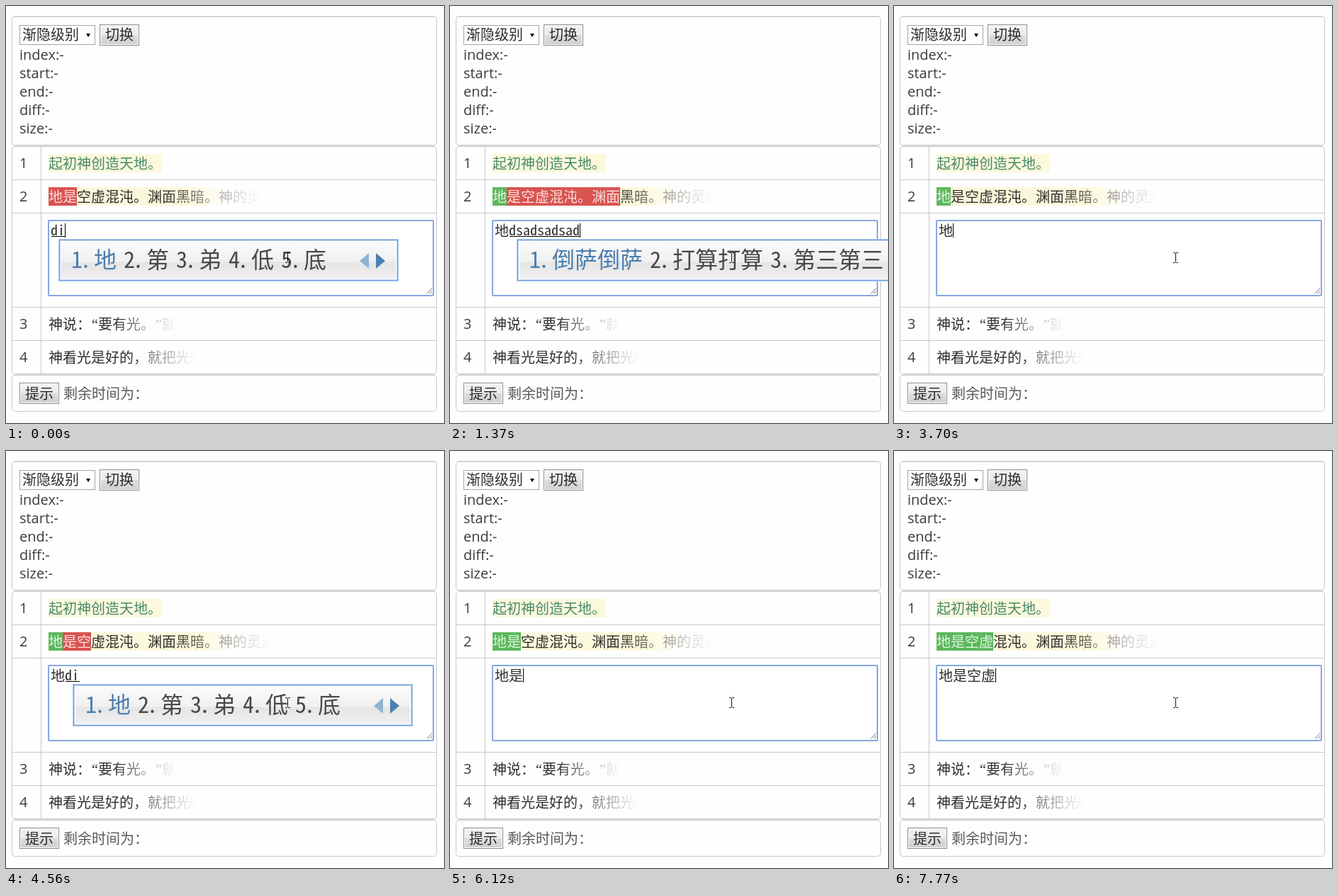
An HTML page for the animation above (8000 ms loop, 618 px wide and 589 px high).

```html
<!DOCTYPE html>
<html lang="zh-CN">
<head>
<meta charset="utf-8">
<title>Typing practice</title>
<style>
  html, body { margin: 0; width: 100%; height: 100%; overflow: hidden; background: #fefefe; }
  svg { display: block; width: 618px; height: 589px; }
  text { white-space: pre; }
  .cjk { font: 300 20px "Noto Sans CJK SC", "Noto Sans CJK", sans-serif; fill-opacity: .82; }
  .label { font: 500 20px "Open Sans", sans-serif; fill: #3c3c3c; }
  .half { font: 20px "Noto Sans Mono CJK SC", "Liberation Mono", monospace; fill-opacity: .82; }
  .quote { font: 20px "Liberation Serif", serif; }
  .cand { font: 32px "Noto Sans CJK SC", "Noto Sans CJK", sans-serif; }
  .num { font: 32px "Noto Sans Mono CJK SC", "Noto Sans CJK SC", sans-serif; }
  #popup { fill: #484848; }
  #popup .first { fill: #4a7eae; }
  .line { fill: none; stroke: #c8c8c8; }
  .button { fill: url(#face); stroke: #8a8a8a; }
  .bevel { fill: none; stroke: #fff; }
</style>
</head>
<body>
<svg viewBox="0 0 618 589">
  <defs>
    <linearGradient id="face" x2="0" y2="1">
      <stop stop-color="#f2f2f2"/><stop offset=".5" stop-color="#ebebeb"/>
      <stop offset=".5" stop-color="#ddd"/><stop offset="1" stop-color="#cfcfcf"/>
    </linearGradient>
    <linearGradient id="glass" x2="0" y2="1">
      <stop stop-color="#fbfbfb"/><stop offset=".54" stop-color="#f0f0f0"/>
      <stop offset=".56" stop-color="#e5e5e5"/><stop offset="1" stop-color="#efefef"/>
    </linearGradient>
    <linearGradient id="ink2" gradientUnits="userSpaceOnUse" y1="0" y2="0">
      <stop/><stop offset=".5" stop-opacity=".45"/><stop offset="1" stop-opacity="0"/>
    </linearGradient>
    <linearGradient id="mark2" gradientUnits="userSpaceOnUse" y1="0" y2="0">
      <stop offset=".3" stop-color="#fcf8dc"/><stop offset=".7" stop-color="#fcf8dc" stop-opacity="0"/>
    </linearGradient>
    <linearGradient id="ink3" gradientUnits="userSpaceOnUse" x1="150" x2="241" y1="0" y2="0">
      <stop/><stop offset=".5" stop-opacity=".45"/><stop offset="1" stop-opacity="0"/>
    </linearGradient>
    <linearGradient id="ink4" gradientUnits="userSpaceOnUse" x1="173" x2="267" y1="0" y2="0">
      <stop/><stop offset=".5" stop-opacity=".45"/><stop offset="1" stop-opacity="0"/>
    </linearGradient>
  </defs>

  <g class="line">
    <rect x="8.5" y="14.5" width="599" height="182" rx="4"/>
    <rect x="8.5" y="198.5" width="599" height="321" rx="4"/>
    <rect x="8.5" y="521.5" width="599" height="51" rx="4"/>
    <path d="M49.5 198V520M8 245.5H608M8 292.5H608M8 425.5H608M8 472.5H608"/>
    <path d="M11 15.5H605M11 197.5H605M11 520.5H605" stroke="#ddd"/>
  </g>

  <rect x="19.5" y="27.5" width="106" height="27" fill="#fff" stroke="#a5a5a5"/>
  <text class="cjk" x="23" y="48">渐隐级别</text>
  <path d="M113 39h6l-3 5z"/>
  <rect class="button" x="132.5" y="26.5" width="55" height="29"/>
  <rect class="bevel" x="133.5" y="27.5" width="53" height="27"/>
  <text class="cjk" x="140" y="48">切换</text>
  <g class="label">
    <text x="19" y="76">index:-</text>
    <text x="19" y="102">start:-</text>
    <text x="19" y="128">end:-</text>
    <text x="19" y="154">diff:-</text>
    <text x="19" y="180">size:-</text>
    <text x="19" y="229">1</text>
    <text x="19" y="276">2</text>
    <text x="19" y="456">3</text>
    <text x="19" y="503">4</text>
  </g>

  <rect x="60" y="209" width="160" height="26" fill="#fcf8dc"/>
  <text class="cjk" x="60" y="230" fill="#1f7050">起初神创造天地。</text>

  <rect x="60" y="256" width="312" height="26" fill="url(#mark2)"/>
  <text class="cjk" x="60" y="277" fill="url(#ink2)">地是空虚混沌。渊面黑暗。神的灵运</text>
  <rect id="right" x="60" y="256" height="26" fill="#5cb85c"/>
  <rect id="wrong" y="256" height="26" fill="#d9534f"/>
  <text id="done" class="cjk" x="60" y="277" fill="#fff"></text>

  <g class="cjk" fill="url(#ink3)">
    <text x="60" y="457">神说：</text>
    <text class="quote" x="121" y="457">“</text>
    <text x="130" y="457">要有光。</text>
    <text class="quote" x="211" y="457">”</text>
    <text x="220" y="457">就</text>
  </g>
  <text class="cjk" x="60" y="504" fill="url(#ink4)">神看光是好的，就把光暗</text>

  <rect class="button" x="19.5" y="532.5" width="55" height="29"/>
  <rect class="bevel" x="20.5" y="533.5" width="53" height="27"/>
  <text class="cjk" x="27" y="555">提示</text>
  <text class="cjk" x="81" y="555" fill="#333">剩余时间为：</text>

  <rect x="60" y="303" width="543" height="106" rx="1" fill="#fff" stroke="#86a8e0" stroke-width="2"/>
  <path d="M594 406l7-7M598 406l3-3" stroke="#777"/>
  <text id="committed" class="cjk" x="63" y="325"></text>
  <text id="typed" class="half" y="324"></text>
  <rect id="underline" y="325" height="1"/>
  <rect id="caret" y="307" width="1" height="20"/>
  <g id="popup"></g>
  <path d="M394 348.5h2.5l1 1 1-1h2.5M397.5 349V361M394 362.5h2.5l1-1 1 1h2.5" fill="none" stroke="#111"/>
</svg>
<script>
const LOOP = 8000;
const VERSE = "地是空虚混沌。渊面黑暗。";
const DI = "地 第 弟 低 底", D = "的 到 都 大 多";
const DSA = "倒萨 打散 堵塞 丢三 第三";
const LONG = "倒萨倒萨 打算打算 第三第三";
const S = "是 说 算 上 啥", SHI = "是 时 使 事 十";
const KONG = "空 孔 控 恐 箜", K = "看 可 快 开 卡";

// time, committed text, letters, right, wrong, candidates, flags
// flags: p plain letters, h hidden caret, i icon after the first candidate
const steps = [
  [0, "", "di", 0, 2, DI],
  [530, "地", "", 1, 0],
  [680, "地", "d", 1, 0, D],
  [800, "地", "ds", 1, 1, "但是 倒萨 多少 都是 第三"],
  [950, "地", "dsa", 1, 3, DSA],
  [1100, "地", "dsad", 1, 3, "倒萨的 打散的 第三等 丢三的"],
  [1250, "地", "dsadsad", 1, 5, LONG],
  [1370, "地", "dsadsadsad", 1, 8, LONG],
  [1490, "地", "dsadsadsad", 1, 10, "", "p"],
  [2050, "地", "dsadsadsad", 1, 10, "", "ph"],
  [2200, "地", "dsadsadsa", 1, 10, "", "p"],
  [2730, "地", "dsadsad", 1, 10, "", "p"],
  [2850, "地", "dsads", 1, 5, "", "p"],
  [3100, "地", "dsad", 1, 4, "", "p"],
  [3250, "地", "dsa", 1, 3, "", "p"],
  [3400, "地", "ds", 1, 2, "", "p"],
  [3550, "地", "d", 1, 1, "", "p"],
  [3700, "地", "", 1, 0],
  [3980, "地", "di", 1, 1, DI],
  [4130, "地", "di", 1, 2, DI],
  [4560, "地", "di", 1, 2, DI, "h"],
  [5120, "地", "d", 1, 2, D],
  [5240, "地", "", 1, 1],
  [5360, "地", "", 1, 0],
  [5480, "地", "s", 1, 0, S, "i"],
  [5630, "地", "sh", 1, 1, "是 说 上 啥 时", "i"],
  [5750, "地", "shi", 1, 3, SHI, "i"],
  [6000, "地是", "", 1, 3],
  [6120, "地是", "", 2, 0],
  [6400, "地是", "k", 2, 0, K, "i"],
  [6520, "地是", "k", 2, 1, K, "i"],
  [6640, "地是", "ko", 2, 1, KONG],
  [6760, "地是", "kon", 2, 2, KONG],
  [6910, "地是", "kon", 2, 3, KONG],
  [7060, "地是", "kong", 2, 4, KONG],
  [7180, "地是", "kongxu", 2, 6, "空虚 控虚 空须 空许 恐需"],
  [7770, "地是空虚", "", 4, 0],
];

const el = id => document.getElementById(id);
const set = (id, attrs) => {
  for (const key in attrs) el(id).setAttribute(key, attrs[key]);
};

function popupMarkup(left, list, icon) {
  const words = list.split(" ");
  let x = left + 18, items = "";
  words.forEach((word, i) => {
    const first = i ? "" : " first";
    items += `<text class="num${first}" x="${x}" y="370">${i + 1}<tspan class="cand">.</tspan></text>` +
      `<text class="cand${first}" x="${x + 32}" y="370">${word}</text>`;
    x += 42 + 32 * word.length;
    if (!i && icon) {
      items += `<path d="M${x - 8.5} 343.5h6v6h-6zM${x - 7} 346.5h3M${x - 5.5} 345v3" fill="none" stroke="#6e9ac2"/>`;
      x += 9;
    }
  });
  const short = left + (icon ? 488 : 480);
  const end = words[0].length > 1 ? Math.max(x + 92, short) : short;
  const frame = (inset, colour) =>
    `<rect x="${left + inset}" y="${329 + inset}" width="${end - left - 2 * inset}" height="${60 - 2 * inset}" fill="${colour}"/>`;
  return frame(0, "#a9c9ee") + frame(1, "#74a0d8") + frame(2, "#c4dbf3") +
    frame(3, "#fff") + frame(4, "url(#glass)") + items +
    `<path d="M${end - 55} 360l13-11v22z" fill="#8fb2d2"/>
    <path d="M${end - 19} 360l-13-11v22z" fill="#4a81b3"/>`;
}

function render([time, committed, typed, right, wrong, list, flags = ""]) {
  const textX = 63 + 20 * committed.length;
  const caretX = textX + 10 * typed.length;
  el("committed").textContent = committed;
  el("typed").textContent = typed;
  el("done").textContent = VERSE.slice(0, right + wrong);
  set("typed", { x: textX });
  set("underline", { x: textX + 1, width: flags.includes("p") ? 0 : 10 * typed.length });
  set("caret", { x: caretX, visibility: flags.includes("h") ? "hidden" : "visible" });
  set("right", { width: 20 * right });
  set("wrong", { x: 60 + 20 * right, width: 20 * wrong });
  const fadeEnd = time ? 373 : 359;
  for (const id of ["ink2", "mark2"]) set(id, { x1: fadeEnd - 142, x2: fadeEnd });
  el("popup").innerHTML = list
    ? popupMarkup(74 + 20 * committed.length, list, flags.includes("i")) : "";
}

let shown;
const start = performance.now();
function tick(now) {
  const time = Math.max(0, now - start) % LOOP;
  const step = steps.findLast(s => s[0] <= time);
  if (step !== shown) render(shown = step);
  requestAnimationFrame(tick);
}
tick(start);
</script>
</body>
</html>
```
